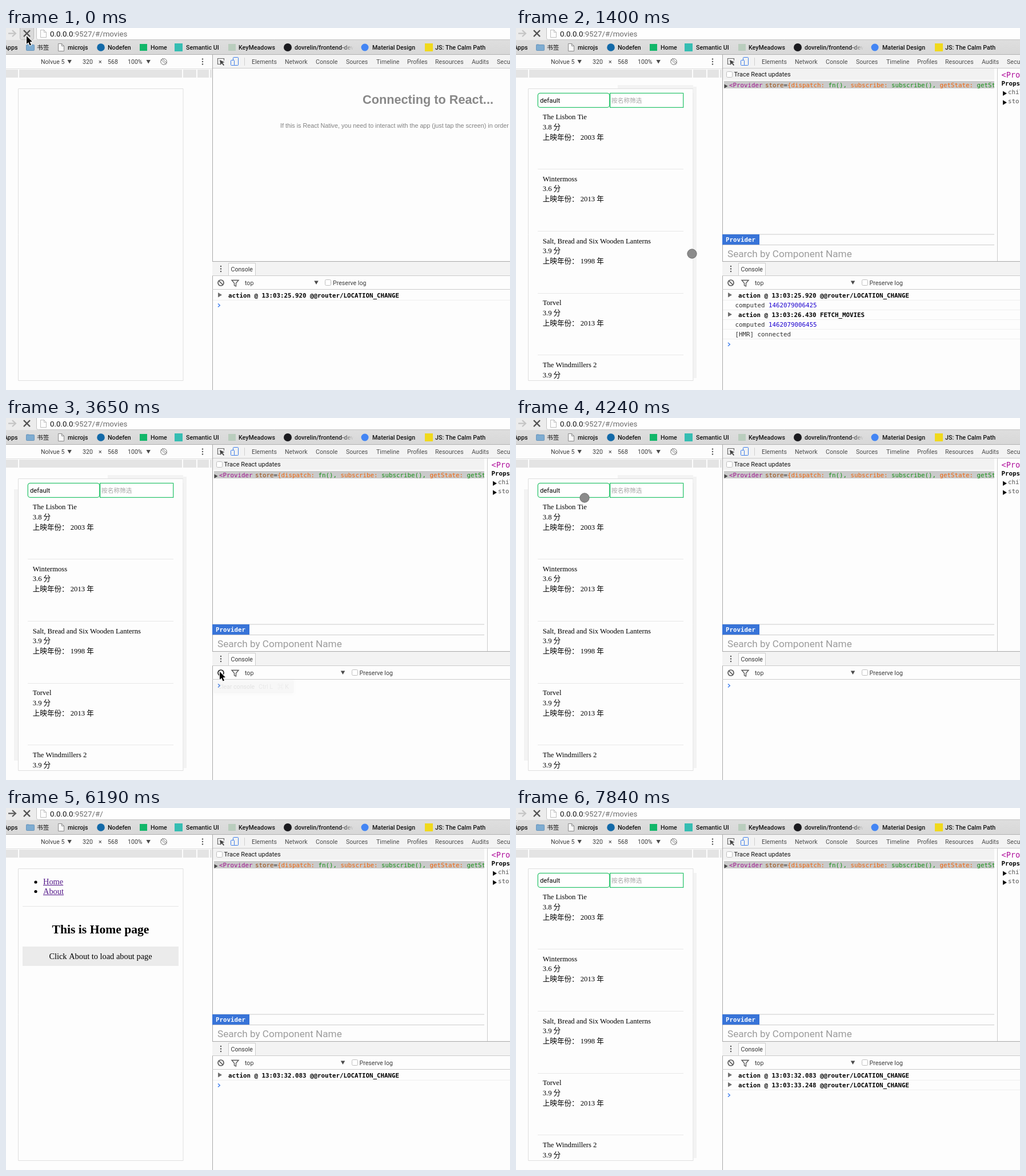
An HTML page with a canvas that plays this animation: 882 px wide and 635 px high, repeating every 8 s.

```html
<!DOCTYPE html>
<html lang="en">
<head>
<meta charset="utf-8">
<title>Movie list in dev tools</title>
<style>
  html, body { margin: 0; width: 100%; height: 100%; overflow: hidden; background: #fdfdfd; }
  canvas { display: block; }
</style>
</head>
<body>
<canvas id="stage" width="882" height="635"></canvas>
<script>
const ctx = document.getElementById('stage').getContext('2d');
const LOOP = 8000;
const CJK = '"Noto Sans CJK SC", "Noto Sans CJK JP", "Noto Sans CJK"';
const UI = `Roboto, ${CJK}, "DejaVu Sans", sans-serif`;
const SANS = '"Liberation Sans", Arial, sans-serif';
const SERIF = `"Liberation Serif", ${CJK}, serif`;
const MONO = '"DejaVu Sans Mono", monospace';
const PAGE = '#fdfdfd', BAR = '#f3f3f3', RULE = '#cbcbcb', GREEN = '#2fc56f';
const CHAR = 6.5; // advance of the 10.8px mono font

// Pointer stops: time, x, y, and 1 where it is a touch dot
const pointer = [
  [0, 36, 14, 0], [150, 90, 85, 0], [350, 186.5, 223, 1], [1400, 308, 396, 1],
  [1570, 352, 432, 0], [1720, 371, 443, 0], [1870, 374, 446, 0], [2460, 374, 445, 0],
  [3800, 364, 434, 0], [3950, 300, 345, 1], [4090, 170, 219, 1], [4240, 120, 140, 1],
  [4390, 90, 60, 0], [4540, 73, 27, 0], [4690, 2, 16, 0], [4840, -40, 12, 0],
  [6480, 5, 13, 0], [6660, 12, 11, 0], [7400, 7, 13, 0], [7840, -9, 13, 0]
];

const movies = [
  ['The Lisbon Tie', '3.8', 2003],
  ['Wintermoss', '3.6', 2013],
  ['Salt, Bread and Six Wooden Lanterns', '3.9', 1998],
  ['Torvel', '3.9', 2013],
  ['The Windmillers 2', '3.9', 2012]
];

const bookmarks = [
  ['Apps', -4], ['书签', 54], ['microjs', 108], ['Nodefen', 178], ['Home', 253],
  ['Semantic UI', 315], ['KeyMeadows', 407], ['Material Design', 641], ['JS: The Calm Path', 751]
];

const tabs = [
  ['Elements', 430], ['Network', 488], ['Console', 542], ['Sources', 595], ['Timeline', 648],
  ['Profiles', 702], ['Resources', 751], ['Audits', 815], ['Security', 859]
];

function rect(x, y, w, h, color) {
  ctx.fillStyle = color;
  ctx.fillRect(x, y, w, h);
}

function box(x, y, w, h, fill, stroke, r = 0, width = 1) {
  ctx.beginPath();
  ctx.roundRect(x + .5, y + .5, w - 1, h - 1, r);
  if (fill) { ctx.fillStyle = fill; ctx.fill(); }
  if (stroke) { ctx.strokeStyle = stroke; ctx.lineWidth = width; ctx.stroke(); }
}

function dot(x, y, r, color) {
  ctx.fillStyle = color;
  ctx.beginPath();
  ctx.arc(x, y, r, 0, 7);
  ctx.fill();
}

function ring(x, y, r, color, width) {
  ctx.strokeStyle = color;
  ctx.lineWidth = width;
  ctx.beginPath();
  ctx.arc(x, y, r, 0, 7);
  ctx.stroke();
}

function path(points, closed) {
  ctx.beginPath();
  for (let i = 0; i < points.length; i += 2) ctx.lineTo(points[i], points[i + 1]);
  if (closed) ctx.closePath();
}

function line(points, color, width = 1) {
  path(points);
  ctx.strokeStyle = color;
  ctx.lineWidth = width;
  ctx.stroke();
}

function shape(points, color) {
  path(points, true);
  ctx.fillStyle = color;
  ctx.fill();
}

function text(str, x, y, size, color, family = UI, weight = 400, align = 'left') {
  ctx.font = `${weight} ${size}px ${family}`;
  ctx.fillStyle = color;
  ctx.textAlign = align;
  ctx.fillText(str, x, y);
}

const label = (str, x, y, color = '#3c3c3c') => text(str, x, y, 10.6, color);
const mark = (str, x, color = '#111') => text(str, x, 38, 10.7, color, UI, 500);
const mono = (str, x, y, color, weight) => text(str, x, y, 10.8, color, MONO, weight);
const down = (x, y) => shape([x, y, x + 7.4, y, x + 3.7, y + 6.6], '#4a4a4a');
const right = (x, y, s, color) => shape([x, y, x + s, y + s * .6, x, y + s * 1.2], color);
const checkbox = (x, y) => box(x, y, 11, 11, '#fff', '#bdbdbd', 2);

function dots(x, y) {
  for (const d of [-4.5, 0, 4.5]) dot(x, y + d, 1.2, '#555');
}

function sheet(x, y) {
  shape([x, y, x + 6, y, x + 10, y + 4, x + 10, y + 13, x, y + 13], '#fafafa');
  line([x + 6, y, x, y, x, y + 13, x + 10, y + 13, x + 10, y + 4, x + 6, y, x + 6, y + 4, x + 10, y + 4], '#8a8a8a');
}

function browserBar(home, hover) {
  rect(0, 0, 882, 21, '#ececec');
  box(53, -6, 840, 27, '#fefefe', '#c2c2c2', 3);
  if (hover) box(24, -4, 25, 25, '#dadada', '#bcbcbc', 3);
  const arrow = home ? '#5a5a5a' : '#c4c4c4';
  line([4, 9.5, 16, 9.5], arrow, 2.2);
  line([11, 4, 17, 9.5, 11, 15], arrow, 2.2);
  line([31, 4, 42, 15], '#505050', 2.4);
  line([42, 4, 31, 15], '#505050', 2.4);
  ctx.globalAlpha = .55;
  sheet(60.5, 3.5);
  ctx.globalAlpha = 1;
  text('0.0.0.0', 77, 14.5, 13.3, '#111');
  const host = ctx.measureText('0.0.0.0').width;
  text(':9527/#/' + (home ? '' : 'movies'), 77 + host, 14.5, 13.3, '#6c6c6c');

  const bar = ctx.createLinearGradient(0, 21, 0, 46);
  bar.addColorStop(0, '#dedede');
  bar.addColorStop(1, '#d8d8d8');
  rect(0, 21, 882, 25, bar);
  rect(0, 46, 882, 1, '#b2b2b2');
  for (const [name, x] of bookmarks) mark(name, x);
  box(35, 28, 6, 4, '#6f9fc6', null, 1);
  box(35, 29, 15, 11, '#7eacd1', '#6996bd', 1);
  sheet(91.5, 27.5);
  dot(166, 34, 6.8, '#1269a8');
  rect(234, 28, 13, 12, '#12b76a');
  rect(295, 27, 14, 14, '#35bdb2');
  rect(389, 28, 13, 12, '#b9cdbd');
  dot(493, 34, 7, '#1b1b1f');
  dot(628, 34, 6.5, '#4285f4');
  rect(733, 27, 14, 14, '#f0d91c');
  const fade = ctx.createLinearGradient(585, 0, 608, 0);
  fade.addColorStop(0, '#111');
  fade.addColorStop(1, 'rgba(17,17,17,0)');
  mark('dovrelin/frontend-dev', 505, fade);
}

function deviceBar() {
  rect(0, 71, 361, 1, '#dedede');
  label('Nolvue 5', 61, 63);
  down(107.5, 56);
  label('320', 134, 63);
  label('×', 162, 63);
  label('568', 178, 63);
  label('100%', 213, 63);
  down(245.5, 56);
  ring(276, 59, 5.3, '#787878', 1);
  line([271, 55, 280.5, 64], '#787878', 1);
  line([273, 53.5, 282, 62], '#787878', 1);
  dots(344, 59);
  for (const [x, w] of [[0, 21], [23, 285], [310, 23], [335, 20], [357, 3]]) rect(x, 73, w, 14, '#e4e4e4');
}

function movieList(t) {
  const shade = '#f3f3f3';
  rect(311, 114, 5, 500, shade);
  if (t >= 1400 && t < 6190) {
    rect(178, 100, 132, 6, shade);
    rect(310, 103, 6, 11, shade);
    if (t >= 2010) rect(14, 125, 7, 476, shade);
  }
  box(37.8, 113.8, 126.4, 26, '#fff', GREEN, 4, 1.3);
  box(164.2, 113.8, 129, 26, '#fff', GREEN, 0, 1.3);
  text('default', 42, 131, 11.3, '#000');
  text('按名称筛选', 167, 131, 10.7, '#a5a5a5');
  ctx.save();
  ctx.beginPath();
  ctx.rect(22, 107, 287, 511);
  ctx.clip();
  movies.forEach(([title, score, year], i) => {
    const y = 160 + i * 108.8;
    text(title, 46.7, y, 12.6, '#000', SERIF);
    text(score + ' 分', 46.7, y + 17.5, 12.6, '#000', SERIF);
    text(`上映年份： ${year} 年`, 46.7, y + 35.5, 12.6, '#000', SERIF);
    rect(38, Math.round(y + 87), 255, 1, '#e8e8e8');
  });
  ctx.restore();
}

function homePage() {
  ['Home', 'About'].forEach((name, i) => {
    const y = 134 + i * 16.5;
    dot(52, y - 4, 2.6, '#000');
    text(name, 65, y, 14.4, '#551a8b', SERIF);
    rect(65, Math.round(y + 1), ctx.measureText(name).width, 1, '#551a8b');
  });
  rect(29, 172, 273, 1, '#e6e6e6');
  text('This is Home page', 165.5, 220, 21.6, '#000', SERIF, 700, 'center');
  rect(29, 243, 273, 34, '#ebebeb');
  text('Click About to load about page', 165.5, 265, 14.4, '#000', SERIF, 400, 'center');
}

function toolTabs() {
  rect(361, 47, 521, 24, BAR);
  rect(361, 70, 521, 1, RULE);
  line([376, 63.5, 370.5, 63.5, 370.5, 53.5, 381.5, 53.5, 381.5, 57], '#666', 1.2);
  shape([374, 56, 382.5, 60, 379, 61, 382, 65, 380.5, 66, 377.5, 62, 375.5, 65], '#444');
  box(397, 51, 10, 15, null, '#3b7be8', 1);
  box(393, 56, 7, 10, BAR, '#3b7be8', 1);
  rect(417, 52, 1, 14, '#cfcfcf');
  for (const [name, x] of tabs) label(name, x, 63, '#4c4c4c');
}

function waiting() {
  text('Connecting to React...', 624, 133, 21.7, '#888', SANS, 700);
  text('If this is React Native, you need to interact with the app (just tap the screen) in order to establish a connection',
    480, 175, 10.75, '#808080', SANS);
}

function reactTree() {
  rect(362, 71, 475, 20, '#f2f2f2');
  checkbox(368, 76);
  text('Trace React updates', 381.5, 84.5, 10.9, '#111');
  rect(364, 93, 473, 13, '#cacaca');
  right(364.5, 98.5, 6, '#444');
  ctx.save();
  ctx.beginPath();
  ctx.rect(362, 71, 475, 338);
  ctx.clip();
  mono('<Provider', 373, 103.5, '#a0118f');
  let x = 436;
  const parts = [
    ['store', '#9a4a0c'], ['=', '#333'], ['{dispatch: ', '#f0640a'], ['fn(), ', '#159015'],
    ['subscribe: ', '#f0640a'], ['subscribe(), ', '#159015'], ['getState: ', '#f0640a'], ['getState()', '#159015']
  ];
  for (const [str, color] of parts) {
    mono(str, x, 103.5, color);
    x += str.length * CHAR;
  }
  ctx.restore();
  rect(842, 71, 1, 338, RULE);
  text('<Provider', 849.5, 87, 13.5, '#b0109c', MONO);
  mono('Props', 849.5, 100.5, '#000', 700);
  right(852, 110.5, 7, '#111');
  mono('children', 861, 115.5, '#555');
  right(852, 126.5, 7, '#111');
  mono('store', 861, 131.5, '#555');
  rect(362, 361.5, 475, 1, RULE);
  rect(361, 362, 65, 18.5, '#3874d8');
  mono('Provider', 367, 375, '#fff', 700);
  rect(362, 380, 475, 1, RULE);
  text('Search by Component Name', 370, 401.5, 17.15, '#9c9c9c');
}

function consoleRows(t) {
  const first = ['action @ 13:03:25.920 @@router/LOCATION_CHANGE'];
  if (t < 650) return [first];
  if (t < 3650) return [
    first, ['computed', '1462079006425'],
    ['action @ 13:03:26.430 FETCH_MOVIES'], ['computed', '1462079006455'], ['[HMR] connected', '']
  ];
  const rows = [];
  if (t >= 6190) rows.push(['action @ 13:03:32.083 @@router/LOCATION_CHANGE']);
  if (t >= 7250) rows.push(['action @ 13:03:33.248 @@router/LOCATION_CHANGE']);
  return rows;
}

function drawer(t) {
  rect(361, 409, 521, 1, '#a8a8a8');
  rect(361, 410, 521, 24, BAR);
  rect(361, 434, 521, 1, RULE);
  rect(361, 458, 521, 1, RULE);
  dots(376, 422.5);
  box(389, 412, 48, 23, PAGE, RULE);
  label('Console', 393.5, 427, '#333');
  const ink = t >= 1720 && t < 3800 ? '#222' : '#5c5c5c';
  ring(376, 447, 5, ink, 1.7);
  line([372.5, 443.5, 379.5, 450.5], ink, 1.7);
  path([395, 442.5, 407, 442.5, 402.5, 447.5, 402.5, 453, 399.5, 451.5, 399.5, 447.5], true);
  ctx.strokeStyle = '#555';
  ctx.lineWidth = 1.3;
  ctx.stroke();
  label('top', 418, 451);
  const shift = t < 650 ? 0 : 46.5;
  down(539.3 + shift, 443.5);
  checkbox(Math.round(558 + shift), 441);
  label('Preserve log', 572 + shift, 451);

  const rows = consoleRows(t);
  rows.forEach(([str, value], i) => {
    const y = 473 + i * 17.1;
    if (value === undefined) {
      right(371, y - 9, 7, '#6e6e6e');
      mono(str, 389, y, '#000', 700);
    } else {
      mono(str, 383.5, y, '#303030');
      mono(value, 383.5 + 9 * CHAR, y, '#1c00cf');
    }
    rect(362, Math.round(y + 4), 520, 1, '#efefef');
  });
  const y = 469.5 + rows.length * 17.1;
  line([371, y - 3, 374.3, y, 371, y + 3], '#3a7cf0', 1.4);
}

function tooltip(t) {
  const alpha = t < 2010 || t >= 3800 ? 0 : t < 2160 ? .5 : t < 3650 ? 1 : .1;
  if (!alpha) return;
  ctx.save();
  ctx.globalAlpha = alpha;
  ctx.shadowColor = 'rgba(0,0,0,.25)';
  ctx.shadowBlur = 3;
  ctx.shadowOffsetY = 1;
  rect(364, 460, 139, 22, '#f2f2f2');
  ctx.shadowColor = 'transparent';
  box(364, 460, 139, 22, null, '#d2d2d2');
  label('Clear console', 371, 475, '#333');
  label('Ctrl L', 442, 475, '#777');
  label('⌘ K', 475, 475, '#777');
  ctx.restore();
}

function drawPointer(t) {
  const [, x, y, touch] = pointer.findLast(p => p[0] <= t);
  if (touch) {
    dot(x, y, 8.5, '#8b8b8b');
    ring(x, y, 8, '#7a7a7a', 1);
    return;
  }
  ctx.save();
  ctx.translate(x, y);
  path([0, 0, 0, 14, 3.2, 11, 5.6, 16.6, 8, 15.6, 5.6, 10.2, 10, 10], true);
  ctx.lineJoin = 'round';
  ctx.strokeStyle = '#fff';
  ctx.lineWidth = 2.2;
  ctx.stroke();
  ctx.fillStyle = '#000';
  ctx.fill();
  ctx.restore();
}

function draw(t) {
  const home = t >= 6190 && t < 7250;
  rect(0, 0, 882, 635, PAGE);
  browserBar(home, t < 150);
  deviceBar();
  box(21, 106, 289.5, 513, PAGE, '#dfdfdf');
  if (home) homePage();
  else if (t >= 650) movieList(t);
  toolTabs();
  rect(361, 71, 1, 564, '#a8a8a8');
  if (t < 1400) waiting();
  else reactTree();
  drawer(t);
  rect(361, 47, 1, 24, '#a8a8a8');
  tooltip(t);
  drawPointer(t);
}

const start = performance.now();
function tick() {
  draw((performance.now() - start) % LOOP);
  requestAnimationFrame(tick);
}
tick();
</script>
</body>
</html>
```
